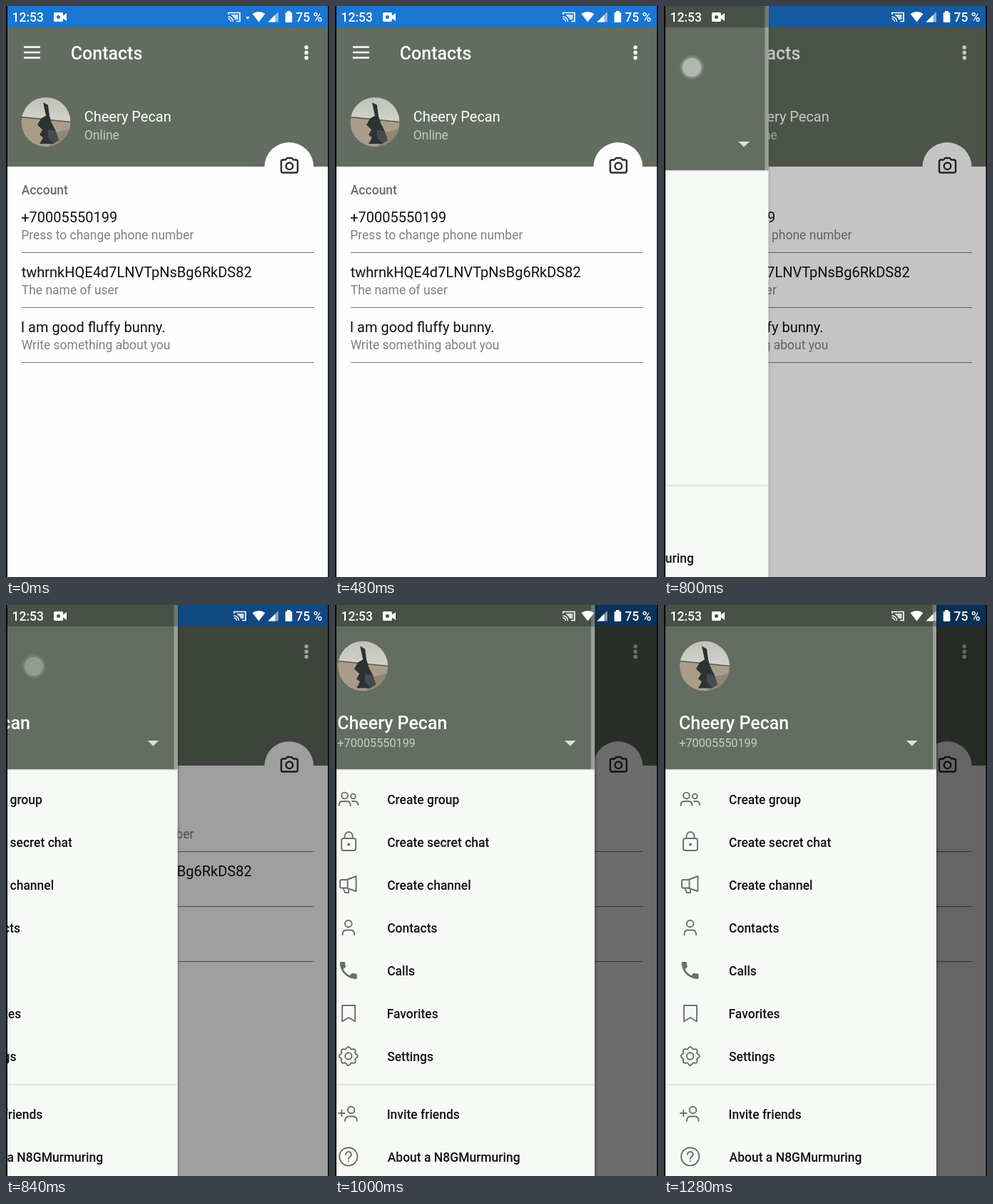
An HTML page for the animation above (1.32 s loop, 453 px wide and 800 px high).

```html
<!DOCTYPE html>
<html lang="en">
<head>
<meta charset="utf-8">
<title>Navigation drawer</title>
<style>
  @property --open { syntax: "<number>"; inherits: true; initial-value: 0; }

  html, body { margin: 0; width: 100%; height: 100%; overflow: hidden; background: #000; }
  svg {
    display: block; width: 453px; height: 800px;
    font: 17.5px Roboto, "Open Sans", sans-serif;
    animation: slide 1320ms step-end infinite;
  }
  .medium { font-weight: 500; }
  .big { font-size: 25px; }
  .value { font-size: 20px; fill: #111; }
  .hint { fill: #808080; }
  .icons { fill: none; stroke: #6b6f6b; stroke-width: 1.9; stroke-linecap: round; stroke-linejoin: round; }

  .scrim { opacity: calc(var(--open) * .6); }
  .drawer { transform: translateX(calc((var(--open) - 1) * 380px)); }
  .edge { opacity: var(--open); }
  .cast { animation: cast 1320ms step-end infinite; }
  .mark { animation: mark 1320ms step-end infinite; }
  .touch { animation: touch 1320ms step-end infinite; }

  @keyframes slide {
    0% { --open: 0; }
    60.6% { --open: .38; }
    63.63% { --open: .628; }
    66.66% { --open: .755; }
    69.69% { --open: .844; }
    72.72% { --open: .91; }
    75.75% { --open: .953; }
    78.78% { --open: .979; }
    81.81% { --open: .993; }
    84.84% { --open: .997; }
    87.87%, 100% { --open: 1; }
  }
  @keyframes cast {
    0% { transform: translateX(-8px); }
    15.15%, 100% { transform: none; }
  }
  @keyframes mark {
    0% { opacity: 1; }
    15.15%, 100% { opacity: 0; }
  }
  @keyframes touch {
    0% { opacity: 0; }
    48.48% { opacity: 1; }
    60.6% { opacity: .72; }
    63.63% { opacity: .45; }
    66.66% { opacity: .22; }
    69.69% { opacity: .08; }
    72.72%, 100% { opacity: 0; }
  }
</style>
</head>
<body>
<svg viewBox="0 0 453 800">
  <defs>
    <clipPath id="round"><circle r="35"/></clipPath>
    <linearGradient id="wall" x2="0" y2="1">
      <stop stop-color="#bfc2b8"/><stop offset="1" stop-color="#d2d3ca"/>
    </linearGradient>
    <linearGradient id="shade">
      <stop stop-opacity=".3"/><stop offset="1" stop-opacity="0"/>
    </linearGradient>
    <radialGradient id="glow">
      <stop offset=".7" stop-color="#fff" stop-opacity=".42"/>
      <stop offset="1" stop-color="#fff" stop-opacity="0"/>
    </radialGradient>
    <g id="avatar" clip-path="url(#round)">
      <path d="M-35-35H35V0L-35-7Z" fill="url(#wall)"/>
      <path d="M-35-7L35 0V35H-35Z" fill="#a99d8a"/>
      <path d="M-35-7L35 0" stroke="#5c5a50" stroke-width="1.6"/>
      <path d="M10 16L35 10V35H4Z" fill="#8f8676"/>
      <path d="M-4-28L3-24L5-9L8 1L14 13L18 26L10 31L-9 31L-4 22L-9 18L-5 11L-12 4L-7-5L0-9Z" fill="#2d3233"/>
      <path d="M3 11L14 13L18 26L10 30L3 22Z" fill="#454c4e"/>
    </g>
  </defs>

  <!-- Account page -->
  <rect width="453" height="800" fill="#fdfefd"/>
  <rect y="30" width="453" height="195" fill="#626c60"/>
  <rect width="453" height="30" fill="#1976d2"/>
  <path d="M25 57.5H48M25 65H48M25 72.5H48" stroke="#fff" stroke-width="2.4"/>
  <g fill="#fff">
    <circle cx="421.3" cy="58" r="2.8"/><circle cx="421.3" cy="65.3" r="2.8"/><circle cx="421.3" cy="72.6" r="2.8"/>
    <text class="medium big" x="90.7" y="75">Contacts</text>
    <text x="109.7" y="162" font-size="20">Cheery Pecan</text>
    <text x="109.7" y="187" fill="#c6cbc5">Online</text>
    <circle cx="397" cy="225.5" r="34.5" fill="#fdfefd"/>
  </g>
  <use href="#avatar" transform="translate(56 162.5) scale(.986)"/>
  <g fill="none" stroke="#2b2d2b" stroke-width="2.4" stroke-linejoin="round">
    <path d="M388.5 215.5H392L394.3 213H400.7L403 215.5H406.5Q409 215.5 409 218V231Q409 233.5 406.5 233.5H388.5Q386 233.5 386 231V218Q386 215.5 388.5 215.5Z"/>
    <circle cx="397.5" cy="224.3" r="4.8"/>
  </g>
  <text class="medium" x="21.7" y="264" fill="#667066">Account</text>
  <text class="value" x="21.2" y="303">+70005550199</text>
  <text class="hint" x="21.2" y="327">Press to change phone number</text>
  <text class="value" x="21.7" y="380">twhrnkHQE4d7LNVTpNsBg6RkDS82</text>
  <text class="hint" x="21.7" y="404">The name of user</text>
  <text class="value" x="20.7" y="457">I am good fluffy bunny.</text>
  <text class="hint" x="21.7" y="481">Write something about you</text>
  <path d="M22 345.5H432M22 422.5H432M22 499.5H432" stroke="#787878" stroke-width="1.2"/>

  <rect class="scrim" width="453" height="800"/>

  <!-- Drawer -->
  <g class="drawer">
    <rect class="edge" x="382" width="4" height="800" fill="url(#shade)"/>
    <rect x="2" width="380" height="800" fill="#f7f9f6"/>
    <rect x="2" width="380" height="230" fill="#636d61"/>
    <rect x="377" width="5" height="230" fill="#9ba199"/>
    <rect x="2" width="380" height="30" opacity=".27"/>
    <rect x="2" y="230" width="380" height="1.5" fill="#d5d8d4"/>
    <use href="#avatar" x="57" y="85.5"/>
    <text class="medium big" x="21" y="174" fill="#fff">Cheery Pecan</text>
    <text x="21.2" y="198.5" font-size="16.25" fill="#c9cec8">+70005550199</text>
    <path d="M340 190H355.5L347.7 197.5Z" fill="#dfe3de"/>
    <path d="M2 672H382" stroke="#d9dbd8" stroke-width="1.3"/>

    <g class="medium" fill="#111">
      <text x="91" y="278.5">Create group</text>
      <text x="91" y="338.5">Create secret chat</text>
      <text x="91" y="398.5">Create channel</text>
      <text x="91" y="458.5">Contacts</text>
      <text x="91" y="518.5">Calls</text>
      <text x="90.5" y="578.5">Favorites</text>
      <text x="91" y="638.5">Settings</text>
      <text x="90.5" y="719.5">Invite friends</text>
      <text x="91.5" y="779.5">About a N8GMurmuring</text>
    </g>

    <g class="icons">
      <circle cx="31.5" cy="267" r="4.4"/>
      <circle cx="43.3" cy="268" r="3.4"/>
      <path d="M23.5 281V279.5Q24 275 29 275H34Q39 275 39.5 279.5V281M42 275H45.5Q50 275.3 50.3 280"/>

      <rect x="27" y="327" width="20" height="17" rx="3"/>
      <path d="M31.5 327V323.5A5.3 5.3 0 0 1 42.5 323.5V327"/>
      <circle cx="37" cy="335.5" r="1" fill="#6b6f6b"/>

      <path d="M27 385H34L47.5 380V401L34 396.500H27Q25 396.500 25 394.500V387Q25 385 27 385ZM35.500 385V396M29.500 397L32 403H37V397.500"/>

      <circle cx="36.7" cy="446.500" r="4.800"/>
      <path d="M28.500 462V460Q29.500 455.500 34 455.500H39.500Q44 455.500 45 460V462"/>

      <path d="M28 561H46V583.500L37 578L28 583.500Z"/>

      <path id="gear"/>
      <circle cx="36.700" cy="632" r="4.700"/>

      <path d="M23 712H31.500M27.300 707.800V716.200"/>
      <circle cx="40.500" cy="707.500" r="4.800"/>
      <path d="M32 723V721Q33 716.500 37.500 716.500H43Q47.500 716.500 48.500 721V723"/>

      <circle cx="36.700" cy="772.800" r="12.600"/>
      <path d="M33 770A3.800 3.800 0 1 1 38.800 773Q36.800 774 36.800 776M36.800 779.300V779.500"/>
    </g>
    <path transform="translate(20.700 496) scale(1.330)" fill="#6b6f6b" d="M6.620 10.790c1.440 2.830 3.760 5.140 6.590 6.590l2.200-2.200q.4-.4 1.020-.24 1.700.57 3.570.57 1 0 1 1V20q0 1-1 1C10.610 21 3 13.390 3 4q0-1 1-1h3.500q1 0 1 1 0 1.870.57 3.570.16.6-.25 1.020z"/>
  </g>

  <!-- Status bar -->
  <g fill="#fff">
    <text class="medium" x="8.500" y="22">12:53</text>
    <path fill-rule="evenodd" d="M69 9H78Q80 9 80 11V13.500L85 10V21L80 17.500V20Q80 22 78 22H69Q67 22 67 20V11Q67 9 69 9ZM71 15.500A2.500 2.500 0 1 0 76 15.500A2.500 2.500 0 1 0 71 15.500Z"/>
    <g class="cast">
      <path d="M320 12V9.500H336V21.500H331" fill="none" stroke="#fff" stroke-width="1.700"/>
      <path d="M319.500 18A4 4 0 0 1 323.500 22M319.500 15A7 7 0 0 1 326.500 22" fill="none" stroke="#fff" stroke-width="1.500"/>
      <path d="M324 12H333.500V19H329Q327.500 14.500 324 13.500Z" opacity=".8"/>
    </g>
    <path class="mark" d="M336.500 15H341.500L339 19Z"/>
    <path d="M345.500 11Q354.500 5 363.500 11L354.500 22.500Z"/>
    <path d="M382 8V22.500H367.500Z" opacity=".5"/>
    <path d="M377.500 12.500V22.500H367.500Z"/>
    <path d="M394 9V7H399V9H400Q401.300 9 401.300 10V22Q401.300 23 400 23H393Q391.700 23 391.700 22V10Q391.700 9 393 9Z"/>
    <text class="medium" x="406.500" y="22">75 %</text>
  </g>

  <g class="touch">
    <circle cx="39" cy="86" r="18" fill="url(#glow)"/>
    <circle cx="39" cy="86" r="13" fill="#d2d4d2"/>
  </g>

  <path d="M0 0H2V800H0ZM451.500 0H453V800H451.500Z"/>
</svg>
<script>
  // Cog outline: a circle whose radius swells eight times around.
  const points = Array.from({ length: 96 }, (_, i) => {
    const a = i / 96 * 2 * Math.PI;
    const r = 11.7 + 1.3 * Math.cos(8 * a);
    return (36.7 + r * Math.cos(a)).toFixed(2) + " " + (632 + r * Math.sin(a)).toFixed(2);
  });
  document.getElementById("gear").setAttribute("d", "M" + points.join("L") + "Z");
</script>
</body>
</html>
```
